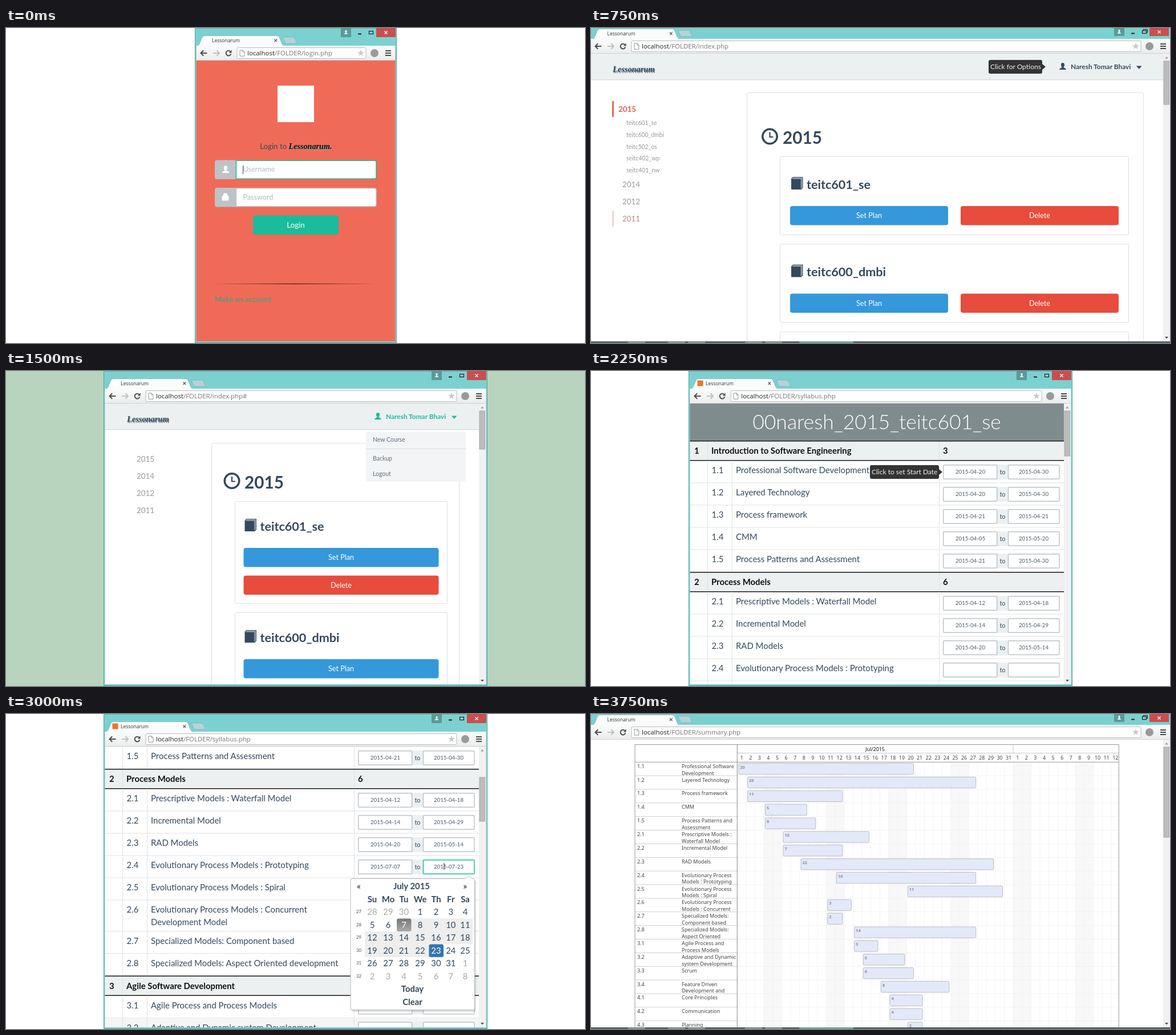
Write an HTML page that moves like this. It is 1015 px wide and 552 px high and loops after 4.5 s.

```html
<!DOCTYPE html>
<html lang="en">
<head>
<meta charset="utf-8">
<title>Lessonarum</title>
<style>
  html, body { margin: 0; width: 100%; height: 100%; overflow: hidden; background: #fff; }
  svg { display: block; width: 1015px; height: 552px; }
  text { font-family: Lato, sans-serif; white-space: pre; }
  .ui { font-family: "Open Sans", sans-serif; }
  .plan { font-family: "Noto Sans", sans-serif; }
  .brand { font-family: "Liberation Serif", serif; font-weight: 700; font-style: italic; }
  .b { font-weight: 700; }
  .light { font-weight: 300; }
  .mid { text-anchor: middle; }
</style>
</head>
<body>
<svg id="stage" viewBox="0 0 1015 552" xmlns="http://www.w3.org/2000/svg"></svg>
<script>
const BRAND = 'Lessonarum', USER = 'Naresh Tomar Bhavi';
const NAVY = '#34495e', TEAL = '#1abc9c', SKY = '#7bd1d0', GREY = '#bdc3c7';

const rect = (x, y, w, h, fill, more = '') =>
  `<rect x="${x}" y="${y}" width="${w}" height="${h}" fill="${fill}" ${more}/>`;
const box = (x, y, w, h, fill, stroke, r = 3, sw = 1) =>
  rect(x, y, w, h, fill, `stroke="${stroke}" stroke-width="${sw}" rx="${r}"`);
const text = (x, y, size, str, fill = NAVY, cls = '') =>
  `<text x="${x}" y="${y}" font-size="${size}" fill="${fill}" class="${cls}">${str}</text>`;
const path = (d, fill, stroke = 'none', sw = 1) =>
  `<path d="${d}" fill="${fill}" stroke="${stroke}" stroke-width="${sw}"/>`;
const at = (x, y, s) => `<g transform="translate(${x} ${y})">${s}</g>`;
const range = n => [...Array(n).keys()];

const person = (x, y, fill, k = 1) => at(x, y, `<g transform="scale(${k})">` +
  path('M-3.2 -3a3.2 3.7 0 0 1 6.4 0q0 2.600 -1.700 4.200q0 1 1.800 1.600q3 1 3 3.200h-12.600q0 -2.200 3 -3.200q1.800 -.6 1.800 -1.600q-1.700 -1.600 -1.700 -4.200z', fill) + '</g>');

const brand = (x, y, size, fill, str = BRAND) =>
  text(x + 1.3, y + 1.6, size, str, '#8b979f', 'brand') + text(x, y, size, str, fill, 'brand');

function scrollbar(x, top, from, to) {
  return rect(x, top, 12.5, 552 - top, '#f1f1f1') + box(x + 1, from, 9.5, to - from, '#bcbcbc', '#a8a8a8', 0) +
    path(`M${x + 3} ${top + 8.5}l3 -3.500 3 3.500z`, '#a0a0a0') + path(`M${x + 3} 541l3 3.500 3 -3.500z`, '#505050');
}

// Browser window around the page; drawn over it so that it also clips the page.
function browser(left, right, page, icon) {
  const full = left < 0, dy = full ? -12 : 0, tab = full ? -1.5 : left;
  const end = full ? 1015 : right, y = 44 + dy, bar = 31 + dy, inset = full ? 0 : 2.5;
  const star = range(10).map(i => {
    const r = i % 2 ? 2.6 : 6.2, a = Math.PI * (i / 5 - .5);
    return (r * Math.cos(a)).toFixed(2) + ' ' + (r * Math.sin(a)).toFixed(2);
  }).join('L');
  let s = rect(Math.max(left, 0), 0, end - Math.max(left, 0), bar, SKY);
  s += rect(Math.max(left, 0) + inset, bar, end - Math.max(left, 0) - 2 * inset, 26, 'url(#bar)');
  s += rect(Math.max(left, 0) + inset, bar + 25.3, end - Math.max(left, 0) - 2 * inset, .7, '#c4c8c8');
  if (full) {
    s += rect(0, 549, 1015, 3, '#596767') + rect(365, 549, 95, 3, '#6fa99a');
    s += [65, 135, 170, 270, 305].map(x => rect(x, 549.5, 30, 2.5, '#8f9a9a')).join('');
  } else {
    s += rect(left, 31, 2.5, 521, SKY) + rect(right - 2.5, 31, 2.5, 521, SKY) + rect(left, 549, right - left, 3, SKY);
    s += `<path d="M${left + .5} 0V551.5H${right - .5}V0" fill="none" stroke="#55a09d"/>`;
    s += rect(left, 0, right - left, 1, '#66b2b0');
  }
  // tabs
  s += path(`M${tab + 154} ${16 + dy}h18q2 0 3 2l4 9h-18q-2 0 -3 -2z`, '#b4d3d8', '#7fb3b8', .8);
  s += path(`M${tab + 4} ${bar + .5}q3 -1 4.500 -4.500l4 -10q1.500 -3.500 4.500 -3.500h127q3 0 4.500 3.500l4 10q1.500 3.500 4.500 4.500z`, '#fafbfb', '#79aaab', .7);
  s += rect(tab + 4, bar, 153, 1, '#fafafa');
  s += rect(tab + 15.5, 16.500 + dy, 10, 10, icon);
  s += text(tab + 30, 25 + dy, 8.5, BRAND, '#333', 'ui');
  s += path(`M${tab + 139.5} ${19.5 + dy}l4.600 4.600m0 -4.600l-4.600 4.600`, 'none', '#555', 1.2);
  // window buttons
  const h = full ? 14 : 16, m = full ? 7 : 8;
  s += rect(end - 98, 0, 18, h, '#5a9a99') + person(end - 89, m - .5, '#eef8f8', .55);
  s += rect(end - 68, m + 1.5, 6, 2, '#222') + box(end - 48.5, m - 2.5, 7, 5, 'none', '#222', 0, 1.2);
  if (full) s += path(`M${end - 46.5} ${m - 2.5}v-2h7v5h-2`, 'none', '#222', 1.1);
  s += rect(end - 36, 0, 34, h, '#c94f4f') + path(`M${end - 21.5} ${m - 2.500}l5 5m0 -5l-5 5`, 'none', '#fff', 1.3);
  // toolbar
  const arrow = 'M-5.500 0H5.500M-.8 -4.700L-5.500 0L-.8 4.700';
  s += at(left + 16, y, path(arrow, 'none', '#505050', 2.1));
  s += at(left + 37.5, y, `<g transform="scale(-1 1)">${path(arrow, 'none', '#c2c2c2', 2.1)}</g>`);
  s += at(left + 59, y, path('M3.400 -2.800A4.400 4.400 0 1 0 4.300 1.200', 'none', '#505050', 2) + path('M5.600 -5.500v5h-5z', '#505050'));
  s += box(left + 74, y - 9.5, right - left - 128, 19, '#fff', '#b9bcbc', 1.5);
  s += at(left + 83, y, path('M-4 -5.200h5l3 3v7.400h-8zM1 -5.200v3h3', '#fff', '#888', .9));
  s += `<text x="${left + 92}" y="${y + 4}" font-size="11.45" fill="#777" class="ui"><tspan fill="#222">localhost</tspan>/FOLDER/${page}</text>`;
  s += at(right - 63, y, path(`M${star}z`, '#c9c9c9'));
  s += `<circle cx="${right - 39}" cy="${y}" r="7" fill="#9a9a9a"/>`;
  s += [-4, 0, 4].map(d => rect(right - 20, y + d - 1, 10, 2, '#4a4a4a')).join('');
  return s;
}

function field(y, hint, edge, icon) {
  return rect(366, y, 44, 33.5, GREY, 'rx="4"') + icon +
    path(`M403.500 ${y + .7}H646q3 0 3 3v26q0 3 -3 3H403.500z`, '#fff', edge, 1.5) +
    text(415.5, y + 20.7, 12.6, hint, '#b2bcc5');
}

function login() {
  const lock = path('M379 294.500h11v7.500h-11zM381 294.500v-1.500a3.500 3.500 0 0 1 7 0v1.500', '#fff', '#fff', .8);
  return rect(331, 0, 354, 552, '#f06b57') + rect(476, 101, 64, 64, '#fff') +
    text(445, 212, 13.4, 'Login to') + brand(495.5, 212, 14.2, '#111', BRAND + '.') +
    field(231.5, 'Username', TEAL, person(385, 248, '#fff', 1.02)) +
    rect(415, 241, 1, 15, '#444') +
    field(280, 'Password', GREY, at(0, 0, lock)) +
    rect(433, 328.3, 150, 33.7, TEAL, 'rx="4"') + text(508, 350, 13.3, 'Login', '#fff', 'mid') +
    rect(358, 447.8, 298, 1.2, 'url(#rule)') +
    text(366, 479.5, 13.4, 'Make an account', '#3a9f88') +
    browser(331, 685, 'login.php', '#fff');
}

const clock = (x, y) => `<circle cx="${x}" cy="${y}" r="12.7" fill="none" stroke="${NAVY}" stroke-width="3.6"/>` +
  path(`M${x} ${y - 7.5}v8.500h6`, 'none', NAVY, 2.2);
const book = (x, y) => path(`M${x} ${y + 3}l3 -3h17.500v19l-3 3h-17.500z`, NAVY) +
  path(`M${x + 1.5} ${y + 3}h15.800v17.500M${x + 3} ${y + 1.500}h16v17.500`, 'none', '#dfe5ea', .8);
const button = (x, y, w, label, fill) =>
  rect(x, y, w, 33.5, fill, 'rx="4"') + text(x + w / 2, y + 21.3, 12.6, label, '#fff', 'mid');

function card(x, y, w, h, name, stacked) {
  const dx = stacked ? -2.5 : 0, dy = stacked ? -5 : 0, bw = stacked ? 342 : 277;
  return box(x + .5, y + .5, w - 1, h - 1, '#fff', '#dcdfe1', 2) +
    book(x + 20 + dx, y + 36 + dy) + text(x + 47 + dx, y + 56.5 + dy, 21.6, name, NAVY, 'b') +
    button(x + 18 + dx, y + 87 + dy, bw, 'Set Plan', '#3498db') +
    (stacked ? button(x + 15.5, y + 130.5, bw, 'Delete', '#e74c3c') : button(x + 317, y + 87, bw, 'Delete', '#e74c3c'));
}

function header(x, w, y, name, fill) {
  return rect(x, y, w, 45.5, '#ecf0f1') + rect(x, y + 45.3, w, 1, '#cdd2d4') +
    person(name - 14, y + 22.3, fill, .95) + text(name, y + 27.3, 11.9, USER, fill, 'b') +
    path(`M${name + 115} ${y + 21.500}h9.500l-4.700 5.500z`, fill);
}

const tip = (x, y, w, label) => rect(x, y, w, 24, '#333', 'rx="3"') +
  path(`M${x + w} ${y + 7}l6 5 -6 5z`, '#333') + text(x + 3, y + 16.2, 12, label, '#eee');

function courses() {
  const codes = ['teitc601_se', 'teitc600_dmbi', 'teitc502_os', 'seitc402_wp', 'seitc401_nw'];
  return header(0, 1003, 45, 841, NAVY) + brand(38, 77, 14.4, NAVY) + tip(697, 56, 94, 'Click for Options') +
    rect(37, 128, 3, 28, '#e9695a') + text(48, 146.5, 13.4, 2015, '#e9604c', 'b') +
    codes.map((c, i) => text(62, 169.7 + i * 20.9, 10.45, c, '#999')).join('') +
    text(55, 279, 13.4, 2014, '#999') + text(55, 308.7, 13.4, 2012, '#999') +
    rect(37, 320, 3, 28, '#f9d3cf') + text(55, 338.5, 13.4, 2011, '#b5897f') +
    box(273.5, 113.5, 695, 500, '#fff', '#dcdfe1', 2) + clock(313.5, 190) + text(336, 203, 29.7, 2015, NAVY, 'b') +
    codes.slice(0, 3).map((c, i) => card(331, 225 + i * 153.4, 612, 138, c)).join('') +
    scrollbar(1003, 45, 58, 134) + browser(-3, 1018, 'index.php', '#fff');
}

function menu() {
  const item = (y, label) => text(643, y, 10.5, label, '#606f7d');
  return rect(0, 0, 1015, 552, '#b9d4be') + rect(171, 0, 673, 552, '#fff') +
    header(173, 656, 57, 666, TEAL) + brand(212, 89, 14.4, NAVY) +
    [2015, 2014, 2012, 2011].map((n, i) => text(229, 159 + i * 30, 13.4, n, '#999')).join('') +
    box(360.5, 126.5, 434, 500, '#fff', '#dcdfe1', 2) + clock(396, 192.5) + text(418, 206, 29.7, 2015, NAVY, 'b') +
    card(401, 228, 373, 180, 'teitc601_se', true) + card(401, 423, 373, 180, 'teitc600_dmbi', true) +
    rect(631, 107, 175, 87, '#f3f4f5', 'rx="3"') + rect(631, 136, 175, 1, '#d6dade') +
    item(124.3, 'New Course') + item(157.3, 'Backup') + item(184.3, 'Logout') +
    scrollbar(829, 57, 70, 137) + browser(171, 844, 'index.php#', '#fff');
}

const chapters = {
  1: ['Introduction to Software Engineering', 3],
  2: ['Process Models', 6],
  3: ['Agile Software Development', '']
};
// number, title with line breaks, first day, days, dates set in the syllabus
const topics = [
  ['1.1', 'Professional Software|Development', 1, 20, '04-20', '04-30'],
  ['1.2', 'Layered Technology', 2, 26, '04-20', '04-30'],
  ['1.3', 'Process framework', 2, 11, '04-21', '04-21'],
  ['1.4', 'CMM', 4, 5, '04-05', '05-20'],
  ['1.5', 'Process Patterns and|Assessment', 4, 6, '04-21', '04-30'],
  ['2.1', 'Prescriptive Models :|Waterfall Model', 6, 10, '04-12', '04-18'],
  ['2.2', 'Incremental Model', 6, 7, '04-14', '04-29'],
  ['2.3', 'RAD Models', 8, 22, '04-20', '05-14'],
  ['2.4', 'Evolutionary Process|Models : Prototyping', 12, 16],
  ['2.5', 'Evolutionary Process|Models : Spiral', 20, 11],
  ['2.6', 'Evolutionary Process|Models : Concurrent|Development Model', 11, 3],
  ['2.7', 'Specialized Models:|Component based', 11, 2],
  ['2.8', 'Specialized Models:|Aspect Oriented|development', 14, 14],
  ['3.1', 'Agile Process and|Process Models', 14, 3],
  ['3.2', 'Adaptive and Dynamic|system Development', 15, 5],
  ['3.3', 'Scrum', 15, 6],
  ['3.4', 'Feature Driven|Development and', 17, 8],
  ['4.1', 'Core Principles', 18, 4],
  ['4.2', 'Communication', 18, 4],
  ['4.3', 'Planning', 20, 2]
];

function dates(y, from, to, active) {
  const date = (x, d) => d ? text(x, y + 23, 9.66, '2015-' + d, '#4a5b6c', 'mid') : '';
  return rect(712, y + 7, 19, 26, '#ecf0f1') + text(721.5, y + 24, 10.8, 'to', NAVY, 'mid') +
    box(617.7, y + 7.7, 94, 24.6, '#fff', GREY, 1.5, 1.5) +
    box(731.5, y + 7.7, 89.5, 24.6, '#fff', active ? TEAL : GREY, 1.5, 1.5) +
    date(665, from) + date(776, to) + (active ? rect(767.5, y + 13, 1, 12, '#222') : '');
}

function table(scroll) {
  let y = 122 - scroll, s = rect(171, 0, 673, 552, '#fff');
  s += rect(173, y - 65, 656, 65, '#7f8c8d') +
    text(501, y - 20, 35.5, '00naresh_2015_teitc601_se', '#fff', 'light mid');
  const lines = (h, xs) => xs.map(x => rect(x, y, 1, h, '#dfe2e4')).join('');
  for (const [num, title, , , from, to] of topics) {
    if (y > 552) break;
    if (num.endsWith('.1')) {
      const [name, count] = chapters[num[0]];
      s += rect(173, y, 656, 35, '#ecf0f1') + lines(35, [204, 610]) +
        rect(173, y, 656, 1.5, '#1a1a1a') + rect(173, y + 34, 656, 1.5, '#1a1a1a') +
        [[181, num[0]], [211, name], [617, count]].map(([x, t]) => text(x, y + 23, 14.9, t, '#111', 'b')).join('');
      y += 35;
    }
    const tall = num === '2.6', h = tall ? 54.5 : 39, parts = title.split('|');
    const first = (tall ? parts.slice(0, 2) : parts).join(' '), picked = scroll && num === '2.4';
    if (num === '3.2') s += rect(173, y, 656, h, '#f5f5f5');
    s += lines(h, [204, 247, 610]) + rect(173, y + h - .5, 656, 1, '#dfe2e4') +
      text(211.5, y + 22.3, 14.93, num) + text(254, y + 22.3, 14.93, first) +
      (tall ? text(254, y + 43.5, 14.93, parts[2]) : '') +
      (picked ? dates(y, '07-07', '07-23', true) : dates(y, from, to));
    y += h;
  }
  return s;
}

function calendar() {
  const cols = [642, 670, 697.5, 726, 754, 779.8, 805];
  const label = (x, y, t, fill = NAVY, cls = 'b mid') => text(x, y, 14.9, t, fill, cls);
  let s = rect(606, 291, 218, 231, '#000', 'rx="4" opacity=".12"') + box(604, 288.5, 217.5, 230, '#fff', '#b5b5b5', 3);
  s += path('M804 289l7 -5 7 5', '#fff', '#c5c5c5');
  s += label(618.5, 307.3, '«') + label(711, 307.3, 'July 2015') + label(805, 307.3, '»');
  s += rect(690, 358.5, 128, 22.5, '#eee') + rect(629, 381, 189, 22.5, '#eee') + rect(629, 403.5, 125, 22.5, '#eee');
  s += rect(685, 358.5, 25.5, 22.5, 'url(#day)', 'rx="3"') + rect(741.5, 403.5, 25.5, 22.5, '#3276b1', 'rx="3"');
  s += ['Su', 'Mo', 'Tu', 'We', 'Th', 'Fr', 'Sa'].map((d, i) => label(cols[i], 329.7, d)).join('');
  for (const r of range(6)) {
    const y = 352.2 + r * 22.5;
    s += text(618.5, y - 3, 7.7, 27 + r, '#3b4a6b', 'mid');
    cols.forEach((x, c) => {
      const n = r * 7 + c - 2, off = n < 1 || n > 31;
      s += label(x, y, n < 1 ? n + 30 : n > 31 ? n - 31 : n, off ? '#aaa' : n === 7 || n === 23 ? '#fff' : NAVY, 'mid');
    });
  }
  return s + label(712.5, 487, 'Today') + label(712.5, 509.5, 'Clear');
}

const syllabus = (scroll, extra, from, to) => table(scroll) + extra + scrollbar(829, 57, from, to) +
  browser(171, 844, 'syllabus.php', '#e8762d');

function summary() {
  const step = 15.6, row = 23.87, day = i => 256.3 + i * step;
  let s = '';
  for (const i of range(43)) {
    if (i % 7 === 3 || i % 7 === 4) s += rect(day(i), 84, step, 468, '#f8f8f8');
    s += rect(day(i), 84, .7, 468, '#efefef');
    s += text(day(i) + step / 2, 79.8, 8.9, i % 31 + 1, '#444', 'plan mid');
  }
  topics.forEach(([num, title, from, days], i) => {
    const y = 84.3 + i * row, x = day(from - 1) + 2.5;
    s += rect(77, y + row - .5, 179, .8, '#c4c4c4') + rect(256, y + row - .5, 669, .7, '#efefef');
    s += text(81, y + 10.4, 9, num, '#444', 'plan');
    title.split('|').slice(0, 2).forEach((t, n) => s += text(159, y + 10.4 + n * 11.8, 9, t, '#444', 'plan'));
    s += box(x, y + 2.2, days * step - 5.3, 19.3, '#e3e9f8', '#adb0b8', 1.5, .8);
    s += text(x + 2.5, y + 11.3, 7.5, days, '#8d9097', 'plan b');
  });
  s += rect(256, 68, 669, .8, '#bbb') + rect(77, 83.8, 848, 1, '#999') + rect(739.6, 53, .8, 15, '#bbb') +
    rect(255.8, 53, 1, 499, '#888') + box(77, 53.5, 848.3, 510, 'none', '#999', 0);
  s += text(498, 65, 8.9, 'Jul/2015', '#111', 'plan mid');
  return s + scrollbar(1003, 45, 58, 216) + browser(-3, 1018, 'summary.php', '#fff');
}

const blend = (id, dir, stops) => `<linearGradient id="${id}" ${dir}>` +
  stops.map(([o, c, a = 1]) => `<stop offset="${o}" stop-color="${c}" stop-opacity="${a}"/>`).join('') + '</linearGradient>';
const down = 'x1="0" y1="0" x2="0" y2="1"';
const scenes = [
  login(), courses(), menu(),
  syllabus(0, tip(489, 165, 121, 'Click to set Start Date'), 70, 149),
  syllabus(256, calendar(), 111, 188),
  summary()
];

const stage = document.getElementById('stage');
stage.innerHTML = '<defs>' + blend('bar', down, [[0, '#fafbfb'], [1, '#ebeded']]) +
  blend('day', down, [[0, '#777'], [1, '#aaa']]) +
  blend('rule', '', [[0, '#000', 0], [.5, '#000', .75], [1, '#000', 0]]) + '</defs>' +
  scenes.map(s => `<g class="scene">${s}</g>`).join('');

const groups = stage.querySelectorAll('.scene');
function draw() {
  const now = Math.floor(performance.now() % 4500 / 750);
  groups.forEach((g, i) => g.style.display = i === now ? '' : 'none');
  requestAnimationFrame(draw);
}
draw();
</script>
</body>
</html>
```
